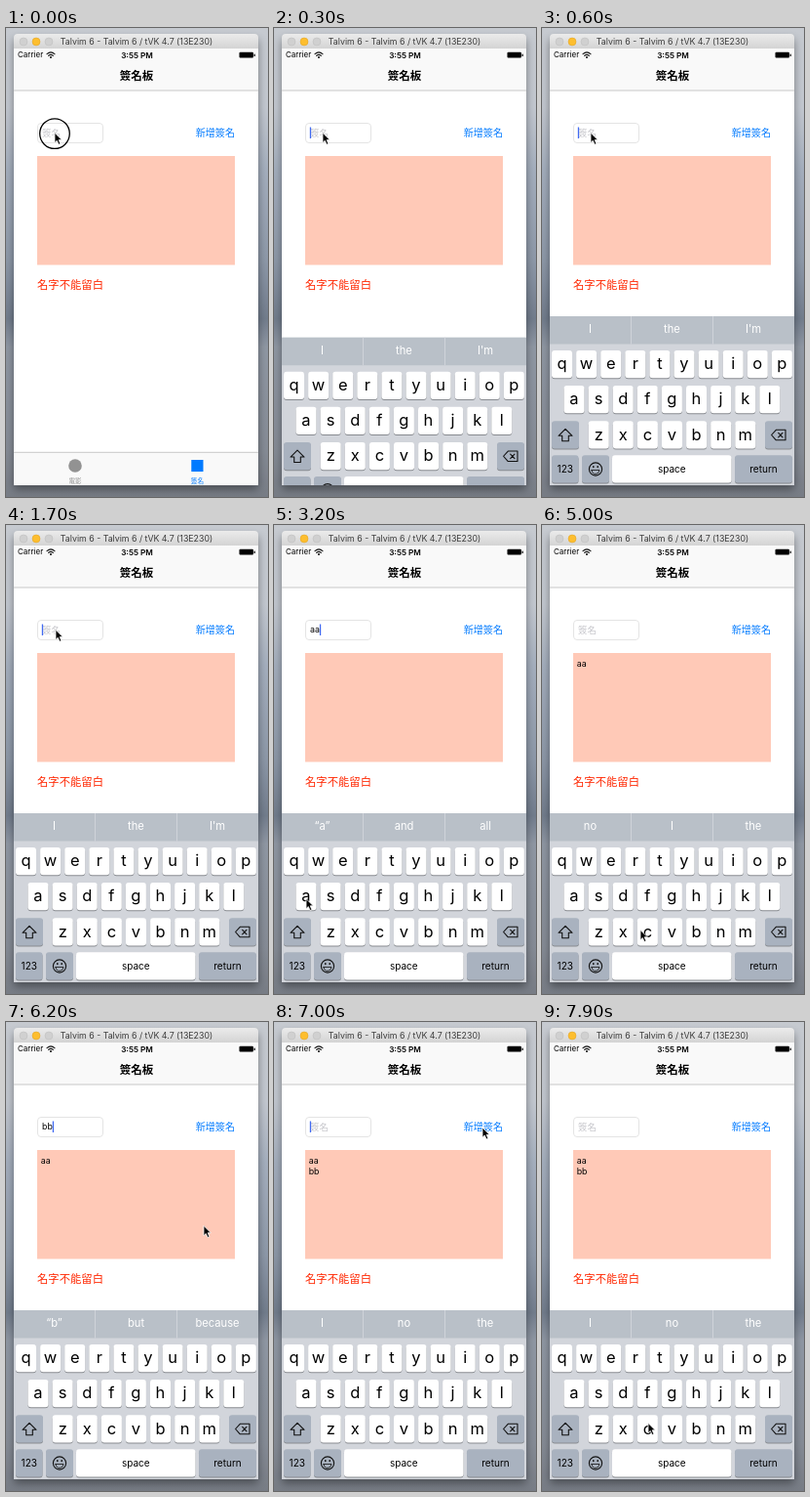
An HTML page for the animation above (8000 ms loop, 269 px wide and 480 px high).

```html
<!DOCTYPE html>
<html lang="zh-Hant">
<head>
<meta charset="utf-8">
<title>簽名板</title>
<style>
  html, body { margin: 0; width: 100%; height: 100%; overflow: hidden; }
  svg { display: block; width: 100vw; height: 100vh; }
  text { font-family: Inter, "Noto Sans CJK TC", "Noto Sans CJK", sans-serif; }
  .mid { text-anchor: middle; }
  .blue { fill: #007aff; }
  .body { font-size: 8.8px; }
  .letter { font-size: 16.5px; text-anchor: middle; }
  .word { font-size: 11.2px; fill: #fff; text-anchor: middle; }
  .label { font-size: 10px; text-anchor: middle; }
  .icon { fill: none; stroke: #111; stroke-width: 1.1; stroke-linejoin: round; stroke-linecap: round; }
</style>
</head>
<body>
<svg viewBox="0 0 269 480" preserveAspectRatio="none">
  <defs>
    <linearGradient id="wall" x2="0" y2="1">
      <stop offset="0" stop-color="#c6cad0"/>
      <stop offset=".17" stop-color="#c3c8d0"/>
      <stop offset=".3" stop-color="#a5afbe"/>
      <stop offset=".5" stop-color="#8d98a8"/>
      <stop offset=".62" stop-color="#727d8d"/>
      <stop offset=".68" stop-color="#9098a4"/>
      <stop offset=".9" stop-color="#868c96"/>
      <stop offset="1" stop-color="#777c85"/>
    </linearGradient>
    <linearGradient id="bar" x2="0" y2="1">
      <stop offset="0" stop-color="#ebebeb"/>
      <stop offset="1" stop-color="#d4d4d4"/>
    </linearGradient>
    <filter id="soft" x="-10%" y="-10%" width="120%" height="120%"><feGaussianBlur stdDeviation="5"/></filter>
    <clipPath id="screen"><rect x="8" y="21" width="251" height="447"/></clipPath>
  </defs>

  <rect width="269" height="480" fill="url(#wall)"/>
  <rect x="8" y="12" width="251" height="460" fill="#000" opacity=".4" filter="url(#soft)"/>
  <path d="M8 21V10Q8 6 12 6H255Q259 6 259 10V21Z" fill="url(#bar)"/>
  <g stroke-width=".5">
    <circle cx="18" cy="14" r="4" fill="#d0d0d0" stroke="#bcbcbc"/>
    <circle cx="31" cy="14" r="4" fill="#fdbe2f" stroke="#dfa023"/>
    <circle cx="44" cy="14" r="4" fill="#d0d0d0" stroke="#bcbcbc"/>
  </g>
  <text x="134" y="17.2" class="mid" font-size="8.8" fill="#3c3c3c">Talvim 6 - Talvim 6 / tVK 4.7 (13E230)</text>

  <rect x="8" y="21" width="251" height="447" fill="#fff"/>
  <rect x="8" y="21" width="251" height="43" fill="#f9f9f9"/>
  <path d="M8 64H259" stroke="#b4b4b4" stroke-width=".7"/>
  <text x="12" y="30.4" font-size="8">Carrier</text>
  <g class="icon">
    <path d="M42 26.6Q46 23.2 50 26.6M43.6 28.4Q46 26.4 48.4 28.4"/>
    <circle cx="46" cy="30" r=".5"/>
  </g>
  <text x="134.5" y="30.6" class="mid" font-size="8.2" font-weight="600">3:55 PM</text>
  <rect x="239.5" y="24.8" width="14.5" height="5.8" rx="1"/>
  <rect x="254.6" y="26.4" width="1.2" height="2.6" rx=".6"/>
  <text x="134" y="53" class="mid" font-size="11.5" font-weight="600">簽名板</text>

  <rect x="32.5" y="97.5" width="67" height="20" rx="3.5" fill="#fff" stroke="#dedede" stroke-width=".8"/>
  <text id="hint" x="37" y="111" font-size="9.4" fill="#c5c5ca">簽名</text>
  <text id="typed" class="body" x="37" y="110.2"></text>
  <rect id="caret" y="101.5" width="1.3" height="11.5" fill="#426bf2"/>
  <text x="235" y="111.2" class="blue" font-size="10.1" text-anchor="end">新增簽名</text>
  <rect x="32" y="131" width="203" height="111.5" fill="#ffc9b7"/>
  <text id="line1" class="body" x="35.7" y="145">aa</text>
  <text id="line2" class="body" x="35.7" y="156.4">bb</text>
  <text x="32" y="267" font-size="11.35" fill="#ff2600">名字不能留白</text>

  <rect x="8" y="434" width="251" height="34" fill="#f9f9f9"/>
  <path d="M8 434.3H259" stroke="#b4b4b4" stroke-width=".7"/>
  <circle cx="71" cy="448" r="6.8" fill="#929292"/>
  <text x="71" y="465.6" class="mid" font-size="6.6" fill="#929292">電影</text>
  <rect x="190.3" y="442" width="12.2" height="12" class="blue"/>
  <text x="196.4" y="465.6" class="mid blue" font-size="6.6">簽名</text>

  <g clip-path="url(#screen)">
    <g id="board">
      <rect x="8" y="295" width="251" height="173" fill="#d2d5db"/>
      <rect x="8" y="295" width="251" height="28.5" fill="#b9c0c8"/>
      <path d="M91.5 295V323.5M175.5 295V323.5" stroke="#d2d5db" stroke-width=".9"/>
      <text class="word" x="49.5" y="312.3"></text>
      <text class="word" x="133.5" y="312.3"></text>
      <text class="word" x="217" y="312.3"></text>
      <g id="keys"></g>
      <g class="icon">
        <path d="M24 410.3L31 417.3H27.3V422.8H20.7V417.3H17Z"/>
        <path d="M235.6 416.5L240.3 411.3H250V421.8H240.3ZM242.7 414.3L247 418.8M247 414.3L242.7 418.8"/>
        <circle cx="55" cy="451.5" r="6.6"/>
        <path d="M51 452.5H59Q58.3 456.5 55 456.5Q51.7 456.5 51 452.5Z" stroke-width=".8"/>
        <path d="M52.8 448.7V449.6M57.2 448.7V449.6" stroke-width="1.5"/>
      </g>
    </g>
    <g id="pop">
      <path d="M-17 -36H17Q21 -36 21 -32V-11C21 -4 10.5 -5 10.5 3V25Q10.5 28.5 7 28.5H-7Q-10.5 28.5 -10.5 25V3C-10.5 -5 -21 -4 -21 -11V-32Q-21 -36 -17 -36Z" fill="#fff" stroke="#b4b7bd" stroke-width=".6"/>
      <text id="popText" class="mid" y="-11" font-size="24"></text>
    </g>
  </g>

  <g id="pointer">
    <circle id="ring" cy=".8" r="15.3" fill="none" stroke="#000" stroke-width="1.3"/>
    <path d="M0 0V10.2L2.3 8L4 12L5.9 11.2L4.2 7.3H7.3Z" stroke="#fff" stroke-width=".8"/>
  </g>
</svg>
<script>
const $ = id => document.getElementById(id);
const words = document.querySelectorAll('.word');
const LOOP = 8000, TICK = 100;

function addKey(x, y, w, text, cls, dark) {
  const fill = dark ? '#a9b2bf' : '#fff';
  const base = cls === 'letter' ? 19.2 : 18;
  $('keys').insertAdjacentHTML('beforeend',
    `<rect x="${x}" y="${y + 1}" width="${w}" height="28.2" rx="3" fill="#888b90"/>
     <rect x="${x}" y="${y}" width="${w}" height="28.2" rx="3" fill="${fill}"/>
     <text class="${cls}" x="${x + w / 2}" y="${y + base}">${text}</text>`);
}

const PITCH = 25.1;
[['qwertyuiop', 20.5, 330], ['asdfghjkl', 33, 366], ['zxcvbnm', 58.2, 402.3]].forEach(([row, x, y]) =>
  [...row].forEach((c, i) => addKey(x + i * PITCH - 10.5, y, 21, c, 'letter')));
addKey(10, 402.3, 28, '', 'label', true);
addKey(229, 402.3, 28, '', 'label', true);
addKey(10, 437.3, 27.5, '123', 'label', true);
addKey(41, 437.3, 28, '', 'label', true);
addKey(72, 437.3, 122.5, 'space', 'label');
addKey(198, 437.3, 59, 'return', 'label', true);

// Pointer stops: time, x, y
const path = [
  [0, 50, 107.3], [1500, 50, 107.3], [1700, 51, 107.3], [1900, 51, 107.3], [2500, 33, 382.5],
  [3200, 33, 382.5], [3700, 214, 108], [4500, 214, 108], [5000, 101, 414.5], [5300, 131, 416],
  [5900, 131, 416], [6200, 203, 208.5], [6500, 214, 108], [7300, 214, 108], [7900, 109, 410.5]
];
const clicks = [[0, 200], [2700, 2900], [3000, 3100], [3900, 4100], [5400, 5600], [5800, 5900], [6800, 7000]];
const presses = [[2800, 2900, 'a', 33, 366], [3000, 3100, 'a', 33, 366],
                 [5500, 5600, 'b', 158.6 - PITCH, 402.3], [5800, 5900, 'b', 158.6 - PITCH, 402.3]];
// Each edit: time, field text, suggestions
const edits = [
  [200, '', 'I,the,I\'m'], [2800, 'a', '“a”,and,all'], [3000, 'aa', '“a”,and,all'],
  [4100, '', 'no,I,the'], [5500, 'b', '“b”,but,because'], [5800, 'bb', '“b”,but,because'],
  [7000, '', 'I,no,the']
];

const during = (t, [from, to]) => t >= from && t < to;
const show = (el, on) => el.setAttribute('visibility', on ? 'visible' : 'hidden');
const move = (el, x, y) => el.setAttribute('transform', `translate(${x} ${y})`);

function pointerAt(t) {
  const i = path.findIndex(p => p[0] > t);
  if (i < 0) return path[path.length - 1].slice(1);
  const [t0, x0, y0] = path[i - 1], [t1, x1, y1] = path[i];
  const k = (t - t0) / (t1 - t0), e = k * k * (3 - 2 * k);
  return [x0 + (x1 - x0) * e, y0 + (y1 - y0) * e];
}

function render(t) {
  move($('pointer'), ...pointerAt(t));
  show($('ring'), clicks.some(c => during(t, c)));

  const rise = Math.min(1, Math.max(0, (t - 100) / 400));
  move($('board'), 0, 174 * (1 - rise) ** 3);

  const [since, text, hints] = edits.filter(e => e[0] <= t).pop() || edits[0];
  $('typed').textContent = text;
  show($('hint'), !text);
  hints.split(',').forEach((w, i) => words[i].textContent = w);
  $('caret').setAttribute('x', text ? 37 + $('typed').getComputedTextLength() : 36.8);
  show($('caret'), t >= since && (t - since) % 1000 < 600);
  show($('line1'), t >= 4100);
  show($('line2'), t >= 7000);

  const press = presses.find(p => during(t, p));
  show($('pop'), press);
  if (press) {
    $('popText').textContent = press[2];
    move($('pop'), press[3], press[4]);
  }
}

const start = performance.now();
function frame() {
  const t = (performance.now() - start) % LOOP;
  render(Math.floor(t / TICK) * TICK);
  requestAnimationFrame(frame);
}
frame();
</script>
</body>
</html>
```
